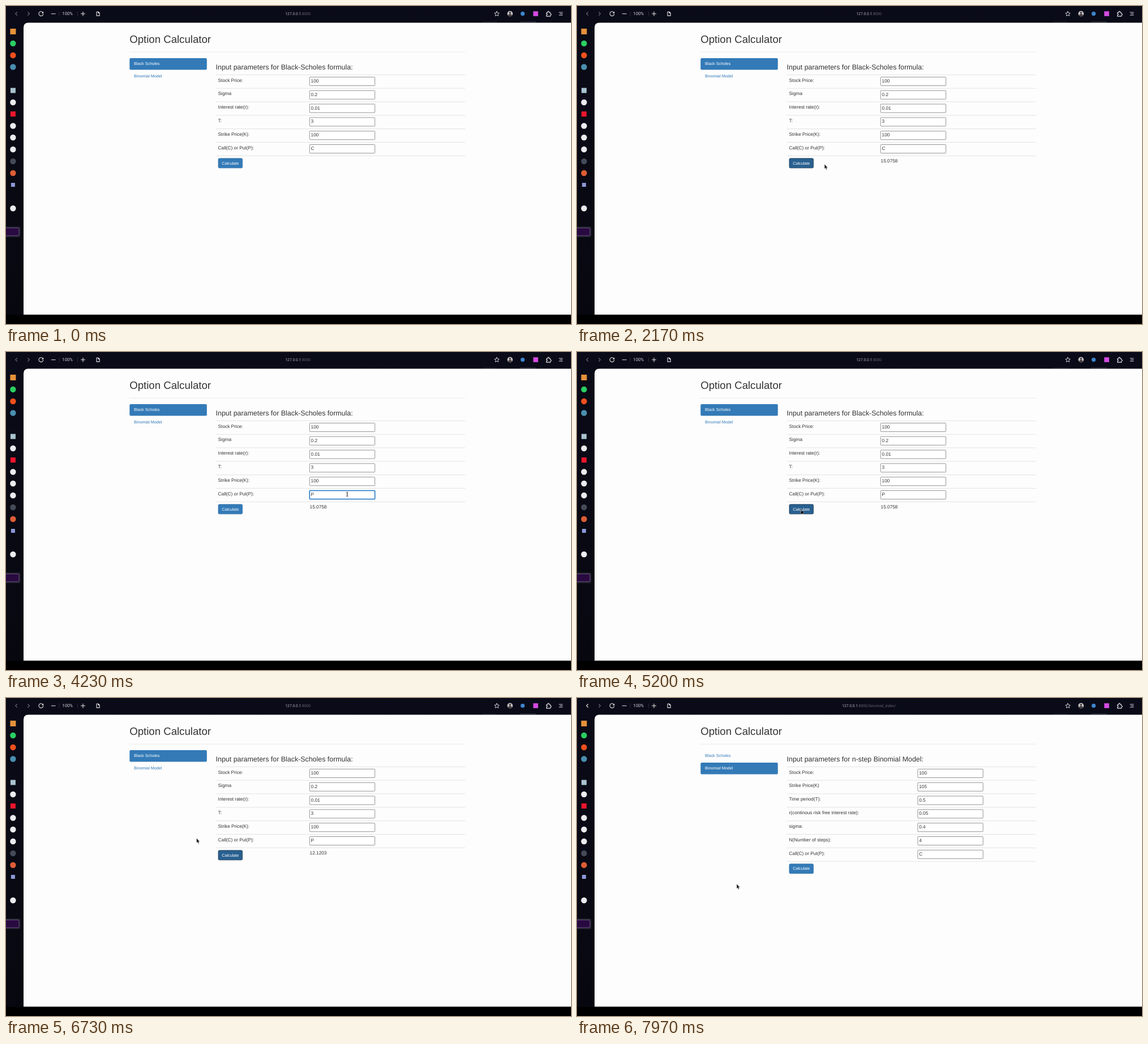
Recreate the animation shown at these times as an HTML page. Size 998x561 px, loop 8 s.

```html
<!DOCTYPE html>
<html lang="en">
<head>
<meta charset="utf-8">
<title>Option Calculator</title>
<style>
  html, body { margin: 0; width: 100%; height: 100%; overflow: hidden; background: #000; }
  svg { display: block; width: 998px; height: 561px; }
  text { font: 8.28px "Liberation Sans", Arial, sans-serif; fill: #333; text-rendering: geometricPrecision; }
  .title { font-size: 18.63px; }
  .heading { font-size: 12.42px; }
  .small { font-size: 7.245px; }
  .bar { font-family: Roboto, sans-serif; fill: #d4d4dc; }
  .rule { stroke: #ddd; stroke-width: .8; }
  .field { fill: #fff; stroke: #7b7b7b; stroke-width: .8; }
  .icon { fill: none; stroke: #e4e4ea; stroke-width: 1.1; stroke-linecap: round; stroke-linejoin: round; }
  .dim { stroke: #77777f; }
</style>
</head>
<body>
<svg viewBox="0 0 998 561">
  <defs>
    <linearGradient id="chrome" x2="0" y2="1">
      <stop stop-color="#0a0b18"/><stop offset="1" stop-color="#07080f"/>
    </linearGradient>
  </defs>
  <rect width="998" height="545" fill="url(#chrome)"/>
  <path d="M841 27h26v2h-26z" fill="#171824"/>
  <path d="M908 27h28v2h-28z" fill="#252631"/>
  <path d="M31 544.5V38q0-8.5 8.5-8.5H998v515z" fill="#fdfdfd"/>

  <path id="back" class="icon" d="M19.5 10.8l-2.8 2.8 2.8 2.8"/>
  <path class="icon dim" d="M38.6 10.8l2.8 2.8-2.8 2.8"/>
  <g id="reload">
    <path class="icon" d="M65.3 11.8a3.9 3.9 0 1 0 .4 2.6"/>
    <path d="M66.2 9.8v3.2h-3.2z" fill="#e4e4ea"/>
  </g>
  <path id="stop" class="icon" d="M59.5 11.3l4.6 4.6m0-4.6l-4.6 4.6"/>
  <path class="icon" d="M80.2 13.7h7M132.5 13.7h7M136 10.2v7"/>
  <path d="M94 9.5v8M126.5 9.5v8" stroke="#33343f" stroke-width=".8"/>
  <text class="bar" x="99.3" y="16.4" style="font-size:7.76px">100%</text>
  <path class="icon" stroke-width=".9" d="M160 10.3h3.2l2 2v4.8H160zM163 10.3v2.2h2.2"/>
  <text id="url" class="bar" x="515.7" y="16" text-anchor="middle" style="font-size:6.73px;fill:#b4b4bc">127.0.0.1<tspan id="path" fill="#62636e"></tspan></text>

  <path class="icon" style="stroke-width:.9" d="M867 9.6l1.3 2.6 2.8.4-2 2 .5 2.9-2.6-1.4-2.6 1.4.5-2.9-2-2 2.8-.4z"/>
  <circle cx="890.3" cy="13.6" r="4.8" fill="#c8c4c4"/>
  <path d="M887 17q0-3 3.3-3t3.3 3q-3.3 2.5-6.6 0z" fill="#473f42"/>
  <circle cx="890.3" cy="11.9" r="1.8" fill="#473f42"/>
  <circle cx="912.6" cy="13.6" r="3.6" fill="#3d86cf"/>
  <rect x="931.3" y="9.3" width="8.6" height="8.6" fill="#d34be0"/>
  <path class="icon" d="M954.6 11.7h2.2q-.5-2.3 1.3-2.3t1.3 2.3h2.2v2.1q1.7 0 1.7 1.2t-1.7 1.2v1.9h-7v-2q1.6-.2 1.6-1.3t-1.6-1.2z"/>
  <path class="icon" style="stroke-width:.9" d="M977 11.2h6M978.5 13.7h4.5M977 16.2h6"/>

  <g id="shortcuts"></g>
  <rect x="-3" y="388.7" width="28.5" height="19.3" rx="3" fill="#1d1d28"/>
  <rect x="-3" y="391.5" width="26" height="13.7" rx="2" fill="#280a40" stroke="#74608a" stroke-width=".9"/>
  <circle id="loading" cx="9.8" cy="398.3" r="1.3" fill="#c04fd8"/>

  <text class="title" x="218.2" y="65.2">Option Calculator</text>
  <path d="M218 81.3H811" stroke="#e9e9e9" stroke-width=".8"/>
  <rect id="linkHover" x="218.3" y="113.9" width="136.5" height="20.6" rx="2" fill="#eee"/>
  <rect id="pill" x="218.3" width="136.5" height="20.6" rx="2" fill="#337ab7"/>
  <text id="link0" class="small" x="226" y="103.9">Black Scholes</text>
  <text id="link1" class="small" x="226" y="125.8">Binomial Model</text>
  <g id="forms"></g>
  <rect id="focus" x="536.3" y="244.5" width="115.3" height="15.1" rx="1" fill="none" stroke="#1c74c8" stroke-width="1.5"/>
  <rect id="selection" x="538.4" y="246.8" width="6.4" height="9.6" fill="#3584e4"/>
  <text id="kind" x="538.6" y="254.1"></text>
  <text id="result" x="536.6" y="276.4"></text>
  <g id="status">
    <path d="M31 532.5H141q2.5 0 2.5 2.5v9.5H31z" fill="#42434b"/>
    <text class="bar" x="33.2" y="541.4" style="font-size:7.65px;fill:#eee">127.0.0.1:8000/binomial_index/</text>
  </g>

  <g id="cursor">
    <path id="arrow" d="M0 0v8.4l1.9-1.6 1.3 3 1.5-.7-1.3-2.8h2.4z" fill="#111" stroke="#fff" stroke-width=".5"/>
    <path id="beam" d="M-1.6-3.7q1.6 0 1.6 1V2.7q0 1-1.6 1M1.6-3.7q-1.6 0-1.6 1V2.7q0 1 1.6 1" fill="none" stroke="#222" stroke-width=".8"/>
    <path id="hand" d="M0 0q1-.7 1.2.5l.2 2.7 2.5.7q.9.4.7 1.6l-.8 3H.2L-1.8 5.6q.2-1 1.8 0z" fill="#111" stroke="#fff" stroke-width=".4"/>
  </g>
</svg>
<script>
const $ = id => document.getElementById(id);
const show = (id, on) => $(id).setAttribute("visibility", on ? "visible" : "hidden");
const ROW = 23.82, TOP = 121.4, LOOP = 8000;

// Plain marks in the side strip: [y, color, square side or 0 for a circle]
$("shortcuts").innerHTML = [
  [45, "#e5913a", 10], [66, "#2bcf62", 0], [87, "#f4501e", 0], [107.5, "#4a8fb0", 0],
  [149, "#a9c3cf", 9], [170, "#ececf0", 0], [190.5, "#f0142c", 9], [211.5, "#ececf0", 0],
  [232, "#ececf0", 0], [253, "#ececf0", 0], [274, "#454a58", 0], [294.7, "#dd5d35", 0],
  [315.5, "#8c98d8", 7], [357, "#ececf0", 0]
].map(([y, color, side]) => side
  ? `<rect x="${12.4 - side / 2}" y="${y - side / 2}" width="${side}" height="${side}" fill="${color}"/>`
  : `<circle cx="12.4" cy="${y}" r="5.2" fill="${color}"/>`).join("");

function form(id, heading, fieldX, rows) {
  const end = TOP + rows.length * ROW;
  const body = rows.map(([label, value], i) => {
    const y = TOP + i * ROW;
    return `<path class="rule" d="M370.6 ${y}H811"/>
      <text x="374.6" y="${y + 12.2}">${label}</text>
      <rect class="field" x="${fieldX}" y="${y + 4}" width="115.3" height="15.1" rx="1"/>
      <text x="${fieldX + 2.3}" y="${y + 13.6}">${value}</text>`;
  }).join("");
  return `<g id="${id}"><text class="heading" x="370.6" y="111.6">${heading}</text>${body}
    <path class="rule" d="M370.6 ${end}H811"/>
    <rect id="${id}Button" x="375" y="${end + 4.5}" width="42.6" height="17" rx="2" fill="#337ab7" stroke="#2e6da4" stroke-width=".7"/>
    <text class="small" x="381.2" y="${end + 15.3}" style="fill:#fff">Calculate</text></g>`;
}

$("forms").innerHTML =
  form("scholes", "Input parameters for Black-Scholes formula:", 536.3, [
    ["Stock Price:", "100"], ["Sigma", "0.2"], ["Interest rate(r):", "0.01"],
    ["T:", "3"], ["Strike Price(K):", "100"], ["Call(C) or Put(P):", ""]]) +
  form("binomial", "Input parameters for n-step Binomial Model:", 601.9, [
    ["Stock Price:", "100"], ["Strike Price(K)", "105"], ["Time period(T):", "0.5"],
    ["r(continous risk free interest rate):", "0.05"], ["sigma:", "0.4"],
    ["N(Number of steps):", "4"], ["Call(C) or Put(P):", "C"]]);

// Pointer path: [ms, x, y]
const route = [
  [700, 848, 233], [830, 786, 239], [1150, 490, 272], [1350, 376, 288], [1500, 394, 279],
  [1640, 394, 279], [1900, 408, 302], [2170, 437, 279], [2400, 468, 270], [2800, 622, 253],
  [3150, 600, 252], [3230, 580, 252], [3530, 514, 250], [3970, 514, 250], [4080, 635, 252],
  [4230, 603, 251], [4770, 423, 263], [5000, 396, 277], [5200, 396, 277], [5400, 362, 280],
  [5600, 384, 281], [5970, 388, 326], [6330, 392, 363], [6470, 392, 363], [6950, 290, 150],
  [7150, 279, 130], [7350, 279, 130], [7970, 282, 328]
];

function pointer(t) {
  const i = route.findIndex(p => p[0] > t);
  if (i < 0) return route.at(-1).slice(1);
  if (i === 0) return route[0].slice(1);
  const [t0, x0, y0] = route[i - 1], [t1, x1, y1] = route[i];
  const k = (t - t0) / (t1 - t0);
  return [x0 + (x1 - x0) * k, y0 + (y1 - y0) * k];
}

const within = (v, from, to) => v >= from && v < to;

function draw(t) {
  const [x, y] = pointer(t);
  const moving = t >= 700, second = t >= 7450;
  const overButton = moving && !second && within(x, 375, 418) && within(y, 268, 287);
  const overField = !second && within(x, 536, 652) && within(y, 244, 260);
  const overLink = moving && within(x, 218, 355) && within(y, 114, 135);
  const buttonFocus = within(t, 1640, 3150) || within(t, 5150, 7200);
  const busy = within(t, 7200, 7450);

  show("scholes", !second);
  show("binomial", second);
  show("kind", !second);
  show("result", !second);
  $("kind").textContent = t < 3970 ? "C" : "P";
  $("result").textContent = t < 1720 ? "" : t < 5230 ? "15.0758" : "12.1203";
  const selected = within(t, 3450, 3970);
  show("selection", selected);
  $("kind").style.fill = selected ? "#fff" : "#333";
  show("focus", within(t, 3150, 5150));

  const dark = overButton || buttonFocus;
  $("scholesButton").setAttribute("fill", dark ? "#286090" : "#337ab7");
  $("scholesButton").setAttribute("stroke", buttonFocus ? "#122b40" : dark ? "#204d74" : "#2e6da4");

  $("pill").setAttribute("y", second ? 113.9 : 92);
  $("link0").style.fill = second ? "#337ab7" : "#fff";
  $("link1").style.fill = second ? "#fff" : overLink ? "#23527c" : "#337ab7";
  show("linkHover", overLink && !second);
  show("status", overLink);
  show("reload", !busy);
  show("stop", busy);
  show("loading", busy);
  $("back").style.stroke = second ? "#fff" : "#77777f";
  $("path").textContent = second ? ":8000/binomial_index/" : ":8000";

  const shape = overButton || overLink ? "hand" : overField ? "beam" : "arrow";
  for (const id of ["arrow", "beam", "hand"]) show(id, moving && id === shape);
  $("cursor").setAttribute("transform", `translate(${x} ${y})`);
}

const start = performance.now();
function tick() {
  draw((performance.now() - start) % LOOP);
  requestAnimationFrame(tick);
}
tick();
</script>
</body>
</html>
```
